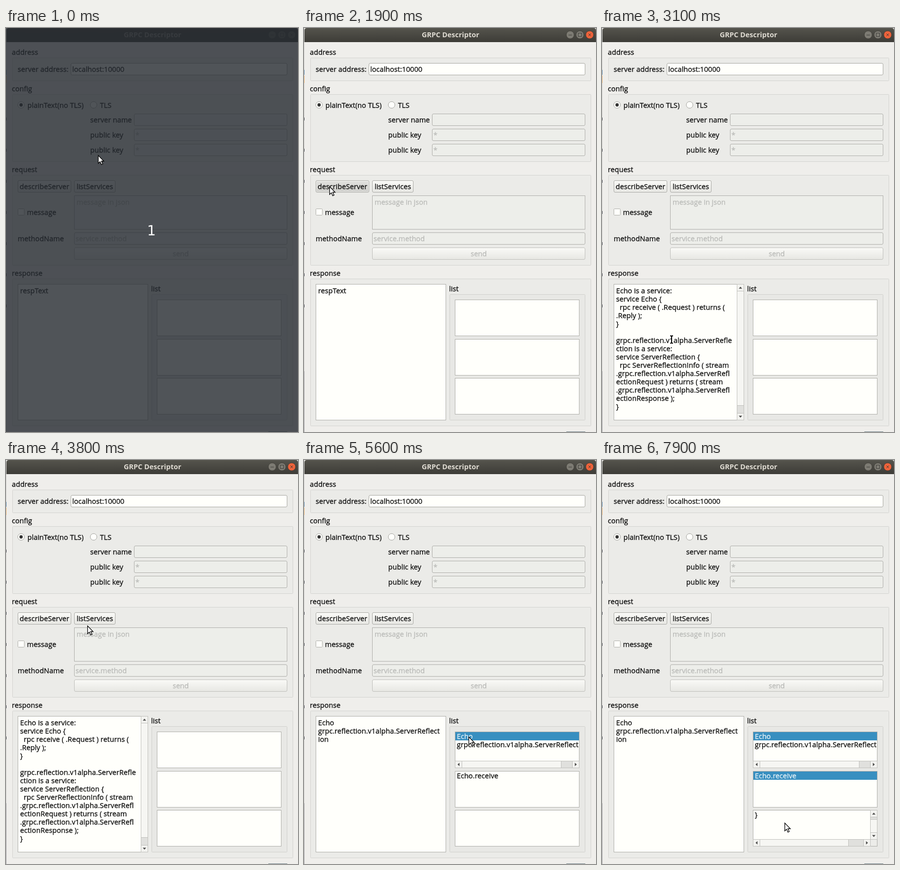
Write an HTML page that moves like this. It is 600 px wide and 830 px high and loops after 8 s.

```html
<!DOCTYPE html>
<html lang="en">
<head>
<meta charset="utf-8">
<title>GRPC Descriptor</title>
<style>
html, body { margin: 0; width: 100%; height: 100%; overflow: hidden; background: #efeeeb; }
svg { display: block; width: 600px; height: 830px; }
text { font: 14.67px "Open Sans", "Noto Sans", sans-serif; white-space: pre; stroke-width: .3; }
.title { font-weight: 700; font-size: 14.5px; stroke-width: 0; }
.count { font: 28px "DejaVu Sans", sans-serif; }
</style>
</head>
<body>
<svg id="stage" viewBox="0 0 600 830" xmlns="http://www.w3.org/2000/svg"></svg>
<script>
const LOOP = 8000, STEP = 100, ROW = 17;
const INK = '#0c0c0c', PALE = '#b9bab7', EDGE = '#aeaeaa', PAPER = '#fffffb', OFF = '#edeeea', BLUE = '#388fc0';

// Markup helpers; y of a label is the middle of its line
const box = (x, y, w, h, fill, stroke = EDGE, r = 0) =>
  `<rect x="${x + .5}" y="${y + .5}" width="${w - 1}" height="${h - 1}" rx="${r}" fill="${fill}" stroke="${stroke}"/>`;
const fill = (x, y, w, h, color) => `<rect x="${x}" y="${y}" width="${w}" height="${h}" fill="${color}"/>`;
const label = (x, y, s, color = INK, extra = '') =>
  `<text x="${x}" y="${y + 5}" fill="${color}" stroke="${color}" ${extra}>${s}</text>`;
const lines = (x, y, rows) => rows.map((s, i) => label(x, y + i * ROW, s)).join('');
const frame = (y, h, name) => label(12, y - 11, name) + box(13, y, 577, h, '#ebebe8', '#d3d3d0', 1);
const input = (x, y, on, s = '') =>
  box(x, y, 578 - x, 25, on ? PAPER : OFF, on ? '#a6a6a2' : EDGE, 2.5) + label(x + 3, y + 13, s, on ? INK : PALE);
const button = (x, y, w, s, color = INK, edge = '#a9a9a5') =>
  box(x, y, w, 25, 'url(#btn)', edge, 2.5) + label(x + w / 2, y + 13, s, color, 'text-anchor="middle"');
const radio = (x, y, on) =>
  `<circle cx="${x}" cy="${y}" r="6.8" fill="${PAPER}" stroke="#a3a39f"/>` +
  (on ? `<circle cx="${x}" cy="${y}" r="3.4" fill="#333"/>` : '');
const span = (from, to, body) => `<g data-from="${from}" data-to="${to}">${body}</g>`;
const clip = (id, x, y, w, h) => `<clipPath id="${id}">${fill(x, y, w, h, '#000')}</clipPath>`;
const selection = (y, s) => fill(311, y, 254, ROW, BLUE) + label(314, y + 9, s, '#e8f3f8');

// Scroll bars are drawn upright; a flat one is the same bar turned
const arrow = (y, turn) =>
  `<path d="M-3.5 2L0 -2L3.5 2Z" transform="translate(7.5 ${y}) rotate(${turn})" fill="#4c4c4a"/>`;
const bar = (x, y, length, thumb, id = '', flat = false) => {
  const part = (top, h, color) => box(0, top, 15, h, color, '#c0c0bc');
  return `<g transform="translate(${x} ${y})${flat ? ' matrix(0 1 1 0 0 0)' : ''}">` +
    part(0, length, '#e0e0dd') + part(0, 15, '#f3f3f0') + arrow(7.5, 0) +
    part(length - 15, 15, '#f3f3f0') + arrow(length - 7.5, 180) +
    `<g id="${id}">${part(14, thumb, '#f6f6f3')}</g></g>`;
};

const winButton = (x, face, mark, glyph) =>
  `<circle cx="${x}" cy="14" r="8" fill="${face}" stroke="#35342f" stroke-width=".7"/>` +
  `<path d="${glyph}" transform="translate(${x} 14)" fill="none" stroke="${mark}"/>`;
const titleBar = (paint, ink, face, close, mark) =>
  `<path d="M1 29V5Q1 0 6 0H595Q600 0 600 5V29Z" fill="url(#${paint})"/>` +
  label(301, 14, 'GRPC Descriptor', ink, 'class="title" text-anchor="middle"') +
  winButton(547, face, mark, 'M-3.5 .5H3.5') +
  winButton(567, face, mark, 'M-3.5 -3.5H3.5V3.5H-3.5Z') +
  winButton(587, close, mark, 'M-2.5 -2.5L2.5 2.5M2.5 -2.5L-2.5 2.5');
const gradient = (id, a, b) =>
  `<linearGradient id="${id}" x2="0" y2="1"><stop stop-color="${a}"/><stop offset="1" stop-color="${b}"/></linearGradient>`;

const description = [
  'Echo is a service:', 'service Echo {', '  rpc receive ( .Request ) returns (', '.Reply );', '}', '',
  'grpc.reflection.v1alpha.ServerRefle', 'ction is a service:', 'service ServerReflection {',
  '  rpc ServerReflectionInfo ( stream', '.grpc.reflection.v1alpha.ServerRefl',
  'ectionRequest ) returns ( stream', '.grpc.reflection.v1alpha.ServerRefl', 'ectionResponse );', '}'];
const services = ['Echo', 'grpc.reflection.v1alpha.ServerReflect', 'ion'];
const method = [
  'Echo.receive is a method:', 'rpc receive ( .Request ) returns ( .Reply );', '',
  'Request is a message:', 'message Request {', '  string message = 1;', '}'];

// Sliver of desktop beside and below the window
const ticks = Array.from({ length: 7 }, (_, i) => fill(0, 184 + i * 64, 1, 6, '#3d4148')).join('');
const desktop = fill(0, 0, 1, 830, '#d4d4d1') + fill(0, 86, 1, 10, '#5b87ab') + fill(0, 98, 1, 15, '#e8b070') +
  ticks + fill(0, 705, 1, 125, '#a5a4a8') + fill(539, 829, 39, 1, '#6c7c83');

document.getElementById('stage').innerHTML =
  '<defs>' + gradient('btn', '#fafaf7', '#e7e7e3') + gradient('active', '#55544d', '#3d3c37') +
  gradient('idle', '#403f3a', '#3b3a36') + clip('reply', 25, 527, 252, 278) +
  clip('top', 311, 559, 254, 59) + clip('low', 311, 722, 240, 57) + '</defs>' +
  fill(0, 0, 600, 830, '#efeeeb') + desktop +
  span(0, 1900, titleBar('idle', '#817f79', '#595852', '#595852', '#3a3935')) +
  span(1900, LOOP, titleBar('active', '#dfdbd2', '#7d7b73', '#ee633b', '#3c3b37')) +

  frame(61, 48, 'address') + label(24, 85, 'server address:') + input(133, 72, true, 'localhost:10000') +

  frame(136, 139, 'config') + radio(31, 158, true) + label(44, 159, 'plainText(no TLS)') +
  radio(180, 158) + label(193, 159, 'TLS') +
  ['server name', 'public key', 'public key'].map((s, i) =>
    label(173, 189 + i * 31, s) + input(263, 176 + i * 31, false, i ? '*' : '')).join('') +

  frame(302, 186, 'request') + button(24, 313, 110, 'describeServer') + button(140, 313, 85, 'listServices') +
  span(1900, 2000, fill(26, 315, 106, 21, 'rgba(0,0,0,.1)')) +
  span(4000, 4100, fill(142, 315, 81, 21, 'rgba(0,0,0,.1)')) +
  box(140, 344, 438, 70, OFF) + label(145, 358, 'message in json', PALE) +
  box(24, 371, 14, 14, PAPER, EDGE, 1) + label(43, 379, 'message') +
  label(24, 433, 'methodName') + input(140, 420, false, 'service.method') +
  button(140, 451, 438, 'send', PALE, '#bfbfbb') +

  frame(515, 303, 'response') + box(24, 526, 268, 280, PAPER) +
  span(0, 2200, label(29, 540, 'respText')) +
  span(2200, 4100, `<g clip-path="url(#reply)"><g id="replyText">${lines(29, 540, description)}</g></g>` +
    bar(277, 526, 280, 236, 'replyThumb')) +
  span(4100, LOOP, lines(29, 540, services)) +

  label(298, 536, 'list') + box(299, 547, 279, 259, '#e8e8e5', '#d0d0cc', 1) +
  [558, 639, 719].map(y => box(310, y, 256, 75, PAPER)).join('') +
  span(4100, LOOP, `<g clip-path="url(#top)">${lines(314, 568, services.slice(0, 2))}</g>` +
    bar(310, 618, 256, 205, '', true)) +
  span(5600, LOOP, selection(559, 'Echo') + label(314, 649, 'Echo.receive')) +
  span(6300, LOOP, selection(640, 'Echo.receive')) +
  span(6500, LOOP, `<g clip-path="url(#low)"><g id="methodText">${lines(314, 729, method)}</g></g>` +
    fill(551, 779, 14, 14, '#ecece9') + bar(310, 779, 242, 183, '', true) + bar(551, 719, 61, 28, 'methodThumb')) +

  span(0, 500, fill(0, 0, 600, 830, 'rgba(37,42,48,.8)') +
    '<text class="count" x="299" y="426" fill="#fff" text-anchor="middle">1</text>') +
  '<path id="pointer" d="M.6 .8V17L4.3 13.6L7 19.6L9.8 18.4L7 12.5H12Z" fill="#fff" stroke="#000" stroke-width="1.3"/>' +
  '<path id="beam" d="M-3 -7.5H-1L0 -6.5L1 -7.5H3M0 -6.5V6.5M-3 7.5H-1L0 6.5L1 7.5H3" fill="none" stroke="#000" stroke-width="2"/>';

// Pointer strokes from one resting place to the next; bend bows the way sideways
const home = { x: 189, y: 261 };
const strokes = [
  { from: 800, to: 900, x: 197, y: 254 },
  { from: 1000, to: 1200, x: 186, y: 209 },
  { from: 1200, to: 1600, x: 52, y: 325, bend: -25 },
  { from: 2200, to: 2700, x: 143, y: 640 },
  { from: 3300, to: 3800, x: 167, y: 340, bend: 28 },
  { from: 4300, to: 4900, x: 363, y: 630 },
  { from: 4900, to: 5200, x: 338, y: 568 },
  { from: 5700, to: 6000, x: 358, y: 651 },
  { from: 6600, to: 6800, x: 357, y: 705 },
  { from: 6900, to: 7100, x: 375, y: 745 }];
const wheel = [7000, 7100, 7300, 7400, 7700, 7900];

const progress = (t, from, to) => Math.min(1, Math.max(0, (t - from) / (to - from)));
const ease = p => p * p * (3 - 2 * p);

function pointerAt(t) {
  let { x, y } = home;
  for (const s of strokes) {
    const p = ease(progress(t, s.from, s.to));
    x += (s.x - x) * p + (s.bend || 0) * Math.sin(Math.PI * p);
    y += (s.y - y) * p;
  }
  return [Math.round(x), Math.round(y)];
}

const byId = id => document.getElementById(id);
const move = (id, x, y) => byId(id).setAttribute('transform', `translate(${x} ${y})`);
const show = (el, on) => { el.style.display = on ? '' : 'none'; };
const spans = [...document.querySelectorAll('[data-from]')];

function draw() {
  const t = Math.floor(performance.now() % LOOP / STEP) * STEP;
  for (const el of spans) show(el, t >= +el.dataset.from && t < +el.dataset.to);

  const [x, y] = pointerAt(t);
  const overText = x < 277 && y > 527;
  show(byId('pointer'), !overText);
  show(byId('beam'), overText);
  move(overText ? 'beam' : 'pointer', x, y);

  const reply = t < 3100 ? progress(t, 2700, 3000) : 0;
  move('replyText', 0, Math.round(-19 * reply));
  move('replyThumb', 0, Math.round(15 * reply));
  const row = wheel.filter(time => time <= t).length;
  move('methodText', 0, -row * ROW);
  move('methodThumb', 0, Math.round(5 * row / wheel.length));
  requestAnimationFrame(draw);
}
draw();
</script>
</body>
</html>
```
